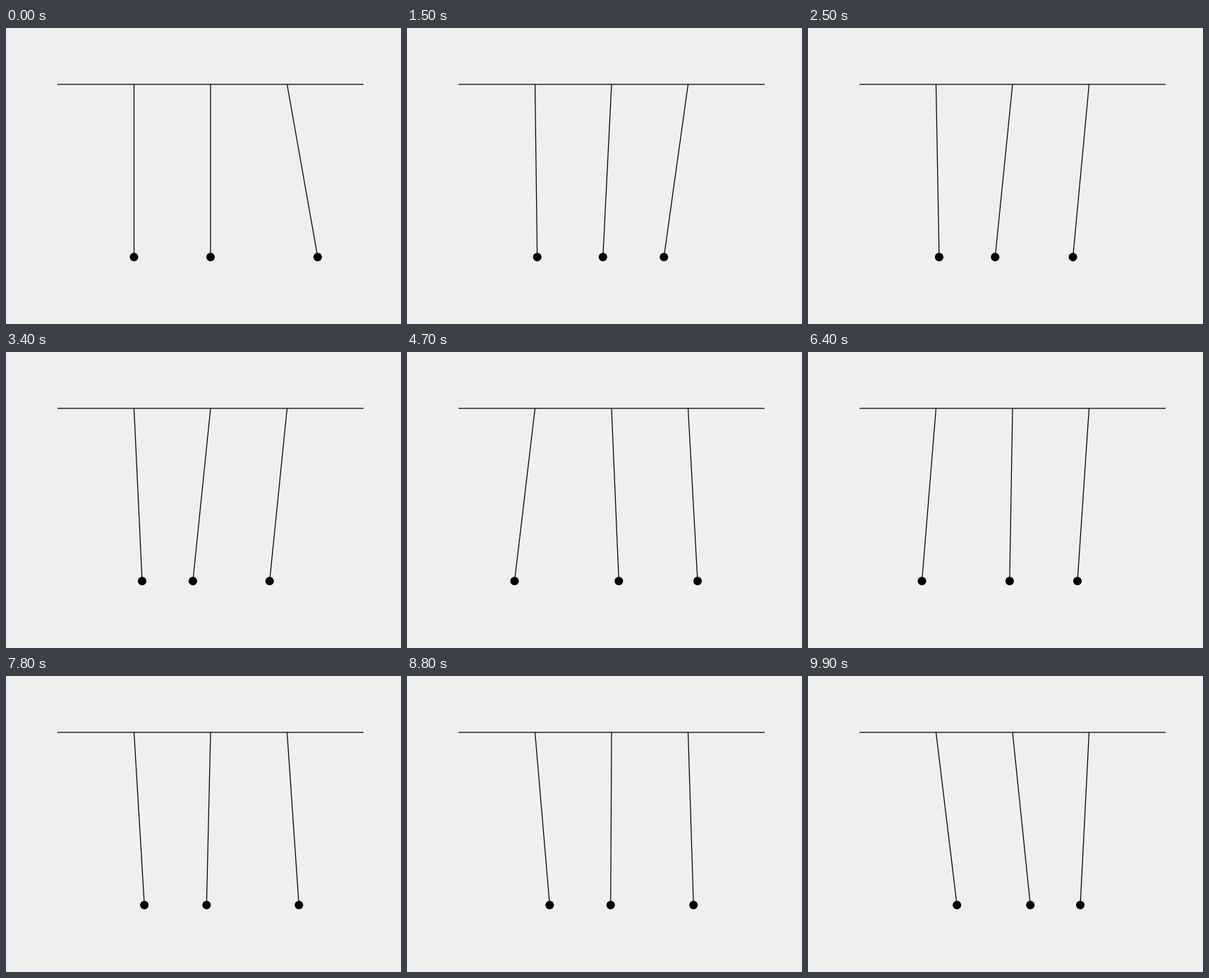
Recreate the animation shown at these times as a matplotlib script. Size 560 by 420 pixels, loop 10000 ms.

```python
import numpy as np
import matplotlib.pyplot as plt
from matplotlib.animation import FuncAnimation

W, H, DPI = 560, 420, 100
FRAMES, STEP = 100, 0.1            # frame count and seconds per frame
UNIT = 108.5                       # pixels between pivots
PIVOTS = 73 + UNIT * np.arange(1, 4)
BAR_Y, BOB_Y = 80, 325
AMP = 0.4 * UNIT

# Three equal pendulums, neighbours joined by weak springs
LENGTH, GRAVITY, COUPLING = 0.245, 9.8, 1.0
OMEGA = np.sqrt((GRAVITY + COUPLING * np.array([0, 1, 3])) / LENGTH)

# Normal modes, weighted so that only the last bob starts displaced
MODES = np.array([[1 / 3, -1 / 2, 1 / 6],
                  [1 / 3, 0, -1 / 3],
                  [1 / 3, 1 / 2, 1 / 6]])


def px(width):
    return width * 72 / DPI


fig = plt.figure(figsize=(W / DPI, H / DPI), dpi=DPI, facecolor="#efefef")
ax = fig.add_axes([0, 0, 1, 1])
ax.set_xlim(0, W)
ax.set_ylim(H, 0)
ax.axis("off")

style = dict(color="black", lw=px(1.25), snap=False, solid_capstyle="butt")
ax.plot([73, 507], [BAR_Y, BAR_Y], **style)
rods = [ax.plot([], [], **style)[0] for _ in PIVOTS]
bobs = [ax.add_patch(plt.Circle((x, BOB_Y), 6, fc="black", ec="none", zorder=3))
        for x in PIVOTS]


def update(i):
    shift = AMP * MODES @ np.cos(OMEGA * i * STEP)
    for rod, bob, x, dx in zip(rods, bobs, PIVOTS, shift):
        rod.set_data([x, x + dx], [BAR_Y, BOB_Y])
        bob.center = (x + dx, BOB_Y)
    return rods + bobs


anim = FuncAnimation(fig, update, frames=FRAMES, interval=1000 * STEP,
                     repeat=True, repeat_delay=0)
plt.show()
```
